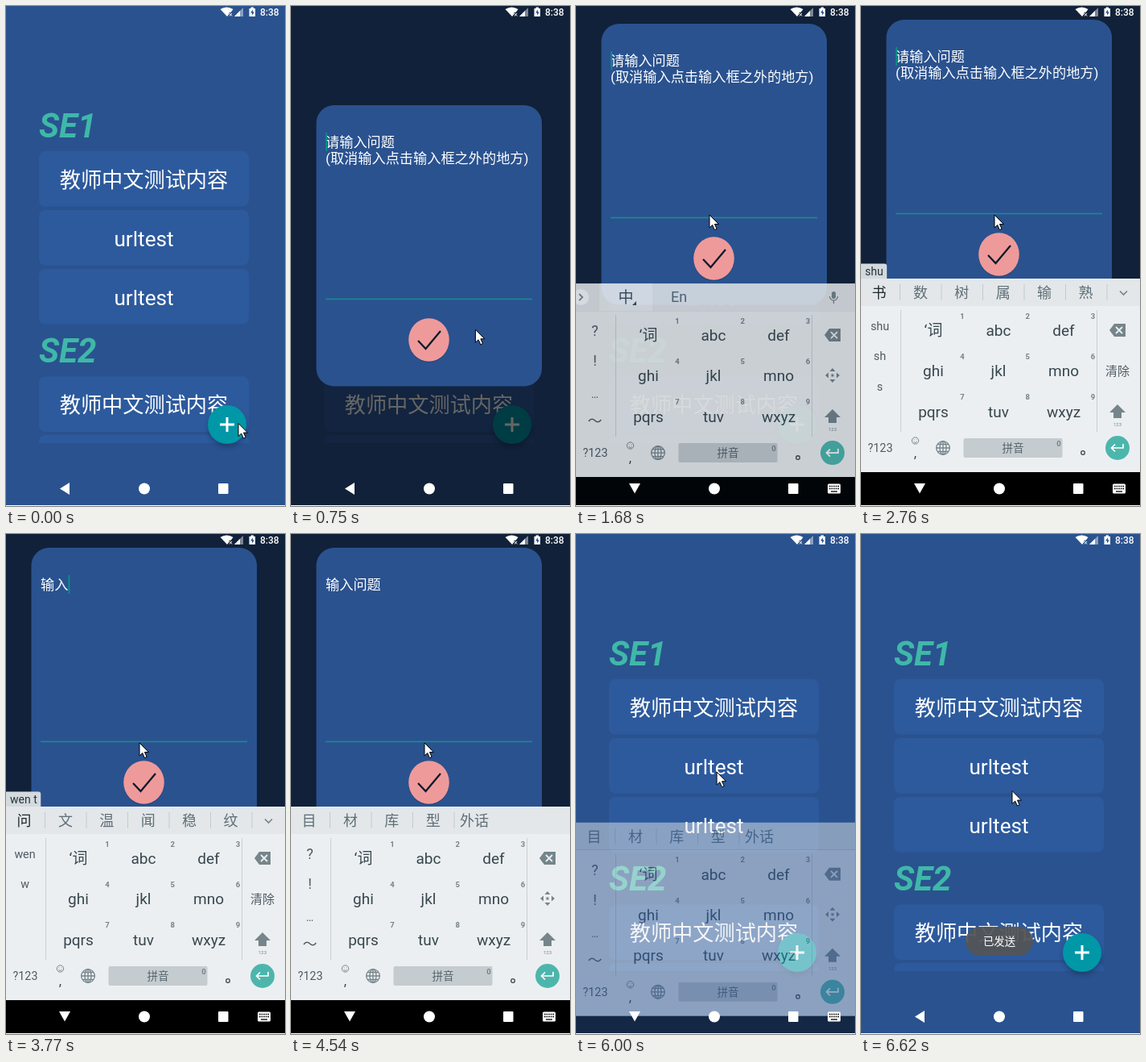
Animation of 347 by 620 pixels, one loop 7.63 s. Source, as an HTML page:

```html
<!DOCTYPE html>
<html lang="zh-CN">
<head>
<meta charset="utf-8">
<title>提问</title>
<style>
html, body { margin: 0; width: 100%; height: 100%; overflow: hidden; background: #2a528f; }
svg { display: block; width: 100%; height: 100%; }
text { font-family: Roboto, "Noto Sans CJK SC", "Noto Sans CJK", sans-serif; white-space: pre; }
.mid { text-anchor: middle; }
.title { font: italic 700 42px Roboto, sans-serif; fill: #3fb8a8; }
.card rect { fill: #2d5a9d; }
.card text { font-size: 26.2px; fill: #fff; }
.body { font-size: 17.2px; fill: #fff; }
.key { font-size: 19px; fill: #37474f; }
.num { font-size: 9.5px; font-weight: 700; fill: #75838a; }
.side { font-size: 14.3px; fill: #4d5b63; }
.cand { font-size: 18px; fill: #5f6f77; }
.icon { fill: #75858c; }
.line { fill: none; stroke: #75858c; stroke-width: 1.3; }
</style>
</head>
<body>
<svg viewBox="0 0 347 620">
  <defs>
    <clipPath id="listClip"><rect y="17" width="347" height="525"/></clipPath>
    <filter id="soft" x="-50%" y="-50%" width="200%" height="200%"><feGaussianBlur stdDeviation="3"/></filter>
  </defs>
  <rect width="347" height="620" fill="#2a528f"/>
  <g id="list" clip-path="url(#listClip)">
    <text class="title" x="41" y="163">SE1</text>
    <text class="title" x="41" y="442">SE2</text>
  </g>
  <circle cx="275" cy="523" r="23" fill="#0b2038" opacity=".45" filter="url(#soft)"/>
  <circle cx="275" cy="519" r="24" fill="#0097a7"/>
  <path d="M266 519h18M275 510v18" stroke="#fff" stroke-width="3"/>

  <g id="toast">
    <rect x="130" y="487" width="84" height="36" rx="18" fill="#525659" opacity=".94"/>
    <text class="mid" x="172" y="510" font-size="13.4" fill="#fff">已发送</text>
  </g>

  <rect id="dim" width="347" height="620"/>

  <g id="dialog">
    <rect x="31.5" width="280.5" height="348.5" rx="22" fill="#2a528f"/>
    <g id="hint" class="body">
      <text x="43" y="52">请输入问题</text>
      <text x="43" y="72">(取消输入点击输入框之外的地方)</text>
    </g>
    <text id="entry" class="body" x="43" y="52"></text>
    <rect id="caret" y="34" width="1.7" height="23" fill="#009688"/>
    <rect x="43" y="239.6" width="257" height="1.7" fill="#178a90"/>
    <rect id="gap" x="204" y="239" width="10" height="3" fill="#2a528f"/>
    <ellipse cx="171.5" cy="292" rx="25.3" ry="27" fill="#18335f" opacity=".4"/>
    <ellipse cx="171.5" cy="291" rx="25.3" ry="26.8" fill="#ef9a9a"/>
    <path d="M158 292l9.5 10L186 280" fill="none" stroke="#0c1b2b" stroke-width="2.3"/>
  </g>

  <g id="ime">
    <rect y="338" width="347" height="34" fill="#e3e7e9"/>
    <rect y="372" width="347" height="206" fill="#eceff1"/>
    <rect y="578" width="347" height="50"/>
    <g id="toolbar">
      <rect x="29" y="338" width="66" height="34" fill="#eceff1"/>
      <circle cx="6" cy="355" r="10" fill="#fafbfb"/>
      <path class="line" d="M4 351l4 4-4 4" style="stroke-width:1.8"/>
      <text class="mid" x="62" y="362" font-size="19" fill="#37474f">中</text>
      <path d="M75 360v5h-5z" fill="#37474f"/>
      <text class="mid" x="128" y="361" font-size="18" fill="#56656d">En</text>
      <rect class="icon" x="318" y="348" width="5" height="9" rx="2.5"/>
      <path class="line" d="M315.500 354a5 5 0 0 0 10 0M320.500 359v4"/>
    </g>
    <g id="candidates"></g>
    <g id="reading">
      <path id="tag" fill="#d3dade"/>
      <text id="pinyin" x="5" y="334" font-size="14" fill="#263238"></text>
    </g>
    <g id="side"></g>
    <g id="keys"><path d="M49.500 377v151M293.500 377v151" stroke="#c9cfd2"/></g>
    <path class="icon" d="M309 402l6-8h14v16h-14z"/>
    <path d="M317 398l8 8M325 398l-8 8" stroke="#eceff1" stroke-width="1.8"/>
    <path id="arrows" class="icon" d="M319 443l3.500 4h-7zM319 461l3.500-4h-7zM310 452l4-3.500v7zM328 452l-4-3.500v7zM317.500 450.500h3v3h-3z"/>
    <text id="clear" class="side mid" x="319" y="458" style="font-size:15px">清除</text>
    <path class="icon" d="M319 494l10 10h-5v7h-10v-7h-5z"/>
    <text class="mid" x="319" y="521" font-size="6" fill="#75858c">123</text>
    <text class="side mid" x="24" y="553">?123</text>
    <circle class="line" cx="67.500" cy="539" r="4.200" style="stroke-width:1"/>
    <path class="line" d="M65.500 540.500q2 2 4 0M66 537.500v.8M69 537.500v.8" style="stroke-width:1"/>
    <text class="mid" x="67.500" y="560" font-size="17" fill="#37474f">,</text>
    <path class="line" d="M93.500 548h17M95 543.500h14M95 552.500h14M102 539.500v17"/>
    <circle class="line" cx="102" cy="548" r="8.300"/>
    <ellipse class="line" cx="102" cy="548" rx="4" ry="8.300"/>
    <rect x="127.500" y="536" width="123" height="24" rx="2" fill="#c5ccd0"/>
    <text class="mid" x="189" y="553" font-size="13.600" fill="#56656d">拼音</text>
    <text class="num mid" x="246" y="546">0</text>
    <circle class="line" cx="276" cy="554" r="2.300" style="stroke:#37474f"/>
    <circle cx="319" cy="548" r="15" fill="#4db6ac"/>
    <path d="M326 543v5h-14M316 543.500l-4.500 4.500 4.500 4.500" fill="none" stroke="#fff" stroke-width="1.700"/>
  </g>

  <g fill="#fff">
    <path d="M266.500 4q8-5 16 0l-3 4h-2v2l-2.500 3z"/>
    <path d="M278 9l3 3.500M281 9l-3 3.500" stroke="#fff"/>
    <path d="M295 2v11h-11z" opacity=".45"/>
    <path d="M291 6v7h-7z"/>
    <path d="M302.500 3h2V1.500h3.500V3h2v10h-7.500z"/>
    <path d="M307 4.500l-3 4h2v3l3-4h-2z" fill="#2a528f"/>
    <text x="316" y="12" font-size="12" font-weight="500">8:38</text>
    <circle cx="172" cy="598.500" r="7"/>
    <rect x="264" y="592" width="12.500" height="13" rx="1"/>
    <path id="back" d="M67 598.500l12-7.500v15z"/>
    <g id="imeNav">
      <path d="M66 592h14l-7 12.500z"/>
      <rect x="313" y="592.500" width="16" height="12" rx="1.500"/>
      <path d="M315 595.500h12M315 598.500h12" stroke="#000" stroke-width="1.500" stroke-dasharray="1.600 1"/>
      <path d="M317 602h8" stroke="#000" stroke-width="1.300"/>
    </g>
  </g>
  <rect y="619" width="347" height="1" fill="#fff"/>
  <path id="mouse" d="M0 0v16l3.700-3.400 2.700 6 2.700-1.200-2.600-5.800h5z" fill="#fff" stroke="#000" stroke-width="1"/>
</svg>

<script>
const LOOP = 7630, STEP = 77.3;
const $ = id => document.getElementById(id);

function add(parent, tag, attrs, text) {
  const node = document.createElementNS('http://www.w3.org/2000/svg', tag);
  for (const name in attrs) node.setAttribute(name, attrs[name]);
  if (text) node.textContent = text;
  return parent.appendChild(node);
}

const label = (parent, cls, x, y, text) => add(parent, 'text', { class: cls + ' mid', x, y }, text);

// Cards of the list
[[180, '教师中文测试内容'], [253, 'urltest'], [326, 'urltest'], [459.5, '教师中文测试内容'], [532, '']]
  .forEach(([y, text]) => {
    const card = add($('list'), 'g', { class: 'card' });
    add(card, 'rect', { x: 41, y, width: 261, height: 68.500, rx: 8 });
    add(card, 'text', { class: 'mid', x: 171.500, y: y + 44.500 }, text);
  });

// Letter keys
'‘词 abc def ghi jkl mno pqrs tuv wxyz'.split(' ').forEach((text, i) => {
  const col = i % 3, row = Math.floor(i / 3);
  label($('keys'), 'key', 90 + col * 81, 409 + row * 50.300, text);
  label($('keys'), 'num', 126 + col * 81.300, 387.500 + row * 50.300, String(i + 1));
});

// Input states: start, committed text, pinyin, candidates, syllable choices
const SHU = '书 数 树 属 输 熟', WEN = '问 文 温 闻 稳 纹';
const states = [
  [0, '', '', '', ''],
  [2590, '', 's', '是 说 上 时 谁 三', 's'],
  [2670, '', 'sh', '是 说 上 时 谁 事', 'sh s'],
  [2745, '', 'shu', SHU, 'shu sh s'],
  [3130, '', 'shu r', SHU, 'shu sh s'],
  [3210, '', 'shu ru', '输入 书 数 树 属 输', 'shu sh s'],
  [3360, '输入', '', '法 的 了 框 到', ''],
  [3515, '输入', 'w', '我 为 玩 无 问 王', 'w'],
  [3595, '输入', 'we', '为 位 问 未 文 我', 'we w'],
  [3670, '输入', 'wen', WEN, 'wen w'],
  [3745, '输入', 'wen t', WEN, 'wen w'],
  [3825, '输入', 'wen ti', '问题 文体 问 文 温 闻', 'wen w'],
  [3980, '输入问题', '', '目 材 库 型 外话', '']
];

const show = (id, on) => $(id).style.display = on ? '' : 'none';
let current;

function showState(state) {
  if (state === current) return;
  current = state;
  const [, text, pinyin, words, syllables] = state;
  show('hint', !text);
  $('entry').textContent = text;
  $('caret').setAttribute('x', 43.200 + text.length * 17.200);
  show('toolbar', !words);
  show('reading', pinyin);
  show('arrows', !pinyin);
  show('clear', pinyin);

  $('pinyin').textContent = pinyin;
  const width = 9.500 + $('pinyin').getComputedTextLength();
  $('tag').setAttribute('d', `M0 319.500H${width - 3}q3 0 3 3V338H0z`);

  const bar = $('candidates');
  bar.replaceChildren();
  const list = words ? words.split(' ') : [];
  list.forEach((word, i) => {
    const node = label(bar, 'cand', 22.500 + i * 51.400, 362, word);
    if (pinyin && i === 0) node.style.fill = '#1f2a30';
    if (pinyin || i < list.length - 1)
      add(bar, 'path', { d: `M${48.500 + i * 51.500} 345v20`, stroke: '#c3cacd' });
  });
  if (pinyin) add(bar, 'path', { class: 'line', d: 'M322 353.500l4.500 4.500 4.500-4.500', style: 'stroke-width:1.700' });

  const side = $('side');
  side.replaceChildren();
  if (pinyin) syllables.split(' ').forEach((s, i) => label(side, 'side', 23.500, 401.500 + i * 37.500, s));
  else [['?', 403], ['!', 440], ['…', 480], ['～', 515]].forEach(([s, y]) => {
    label(side, 'side', 23.500, y, s).style.fontSize = s === '…' ? '14px' : '18px';
  });
}

// Piecewise linear value over [time, value] points
function track(t, points) {
  const i = points.findIndex(p => p[0] > t);
  if (i < 0) return points[points.length - 1][1];
  if (i === 0) return points[0][1];
  const [t0, a] = points[i - 1], [t1, b] = points[i];
  return a + (b - a) * (t - t0) / (t1 - t0);
}

const mouseX = [[360, 289], [590, 284], [820, 204], [1050, 167], [1130, 167], [1240, 166],
  [4760, 166], [4920, 174], [5290, 174], [5380, 175], [6000, 175], [6600, 188]];
const mouseY = [[360, 517.500], [590, 507], [820, 352], [1050, 263], [1130, 263], [1240, 259],
  [4760, 259], [4920, 286], [5290, 286], [5380, 294], [6000, 295], [6600, 318.500]];
const dialogAlpha = [[510, 0], [740, 1], [5600, 1], [5850, 0]];
const dialogY = [[1400, 123], [1520, 60], [1600, 34], [1675, 22], [1750, 18.500], [1829, 17]];
const imeAlpha = [[1440, 0], [1675, .85], [1829, 1], [5850, 1], [6160, 0]];
const imeY = [[1440, 40], [1675, 6], [1829, 0], [5850, 0], [6160, 40]];
const toastAlpha = [[6200, 0], [6460, 1]];

function render(t) {
  const open = track(t, dialogAlpha), ime = track(t, imeAlpha);
  $('dim').style.opacity = open * .6;
  $('dialog').style.opacity = open;
  $('dialog').setAttribute('transform', `translate(0 ${track(t, dialogY)})`);
  $('ime').style.opacity = ime;
  $('ime').setAttribute('transform', `translate(0 ${track(t, imeY)})`);
  $('toast').style.opacity = track(t, toastAlpha);
  $('mouse').setAttribute('transform', `translate(${track(t, mouseX)} ${track(t, mouseY)})`);
  show('gap', t > 800 && t < 1400);
  show('back', ime < .4);
  show('imeNav', ime >= .4);
  show('caret', !(t > 2200 && t < 2590) && !(t > 4520 && t < 5060));
  showState(states.filter(s => s[0] <= t).pop());
}

const start = performance.now();
function frame() {
  const t = (performance.now() - start) % LOOP;
  render(Math.max(0, Math.floor((t + 34) / STEP) * STEP - 26));
  requestAnimationFrame(frame);
}
frame();
</script>
</body>
</html>
```
